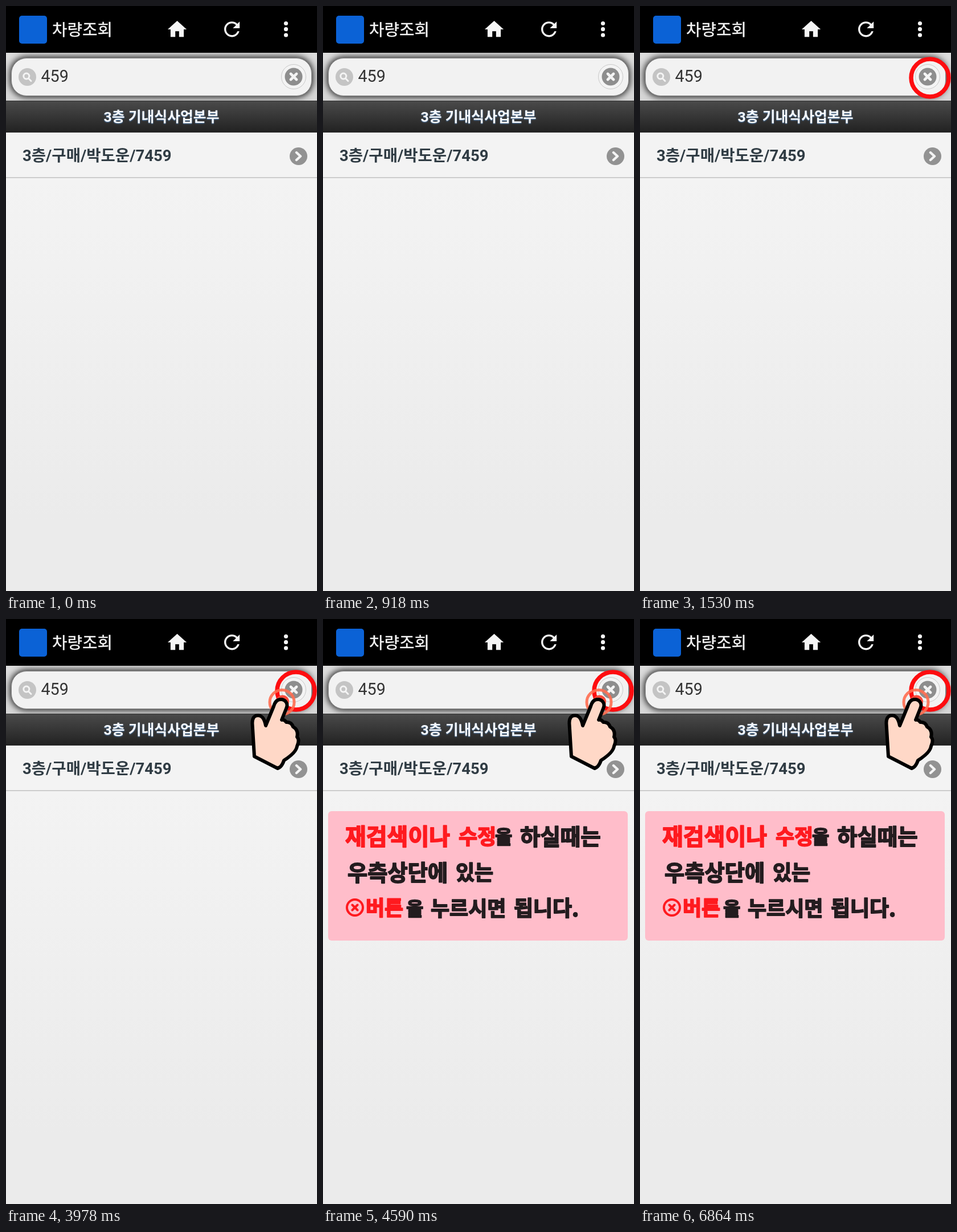
Recreate the animation shown at these times as an HTML page. Size 546 by 1026 pixels, loop 8.38 s.

```html
<!DOCTYPE html>
<html lang="ko">
<head>
<meta charset="utf-8">
<title>차량조회</title>
<style>
  html, body { margin: 0; width: 100%; height: 100%; overflow: hidden; }
  body { position: relative; background: linear-gradient(#f3f3f3 30%, #ebebeb 88%); }
  div, svg { position: absolute; left: 0; box-sizing: border-box; }
  div { width: 546px; }
  .top { top: 0; height: 82px; background: #000; }
  .search { top: 82px; height: 84px; background: linear-gradient(#ddd, #d6d6d6); overflow: hidden; }
  .search div {
    left: 9px; top: 9px; width: 528px; height: 67px; border-radius: 27px;
    background: #f2f2f2; border: 1px solid #888; box-shadow: 0 0 12px 2px #222;
  }
  .bar { top: 166px; height: 56px; background: linear-gradient(#4a4a4a, #222); border: solid #333; border-width: 1px 0; }
  .row { top: 222px; height: 80px; background: #f3f3f3; border-bottom: 2px solid #ccc; }
  svg { top: 0; }
  text { font-family: Roboto, "Noto Sans CJK KR", "Noto Sans CJK", sans-serif; }
  .title { stroke: #f5f5f5; stroke-width: .4; }
  .head { font-weight: 700; text-shadow: 0 1px 2px #5784b5; }
  .note text {
    font-family: "Noto Sans CJK KR", "Noto Sans CJK", sans-serif; font-weight: 900;
    fill: #231c1f; stroke: #231c1f; stroke-width: 1.8; stroke-linejoin: round;
  }
  .note .red { fill: #ff1a1f; stroke: #ff1a1f; }
  .line { fill: none; stroke: #f4f4f4; stroke-linecap: round; stroke-linejoin: round; }
</style>
</head>
<body>
<div class="top"></div>
<div class="search"><div></div></div>
<div class="bar"></div>
<div class="row"></div>

<svg width="546" height="1026" viewBox="0 0 546 1026">
  <!-- App bar -->
  <rect x="23" y="17" width="49" height="49" rx="5" fill="#0b62d6"/>
  <g fill="#f5f5f5">
    <text class="title" x="81" y="52" font-size="28.8">차량조회</text>
    <path transform="translate(280.6 21) scale(1.66)" d="M10 20v-6h4v6h5v-8h3L12 3 2 12h3v8z"/>
    <path transform="translate(376.2 20.4) scale(1.7)" d="M17.65 6.35C16.2 4.9 14.21 4 12 4c-4.42 0-7.99 3.58-7.99 8s3.57 8 7.99 8c3.73 0 6.84-2.55 7.73-6h-2.08c-.82 2.33-3.04 4-5.65 4-3.31 0-6-2.69-6-6s2.69-6 6-6c1.66 0 3.14.69 4.22 1.78L13 11h7V4z"/>
    <circle cx="491.5" cy="30.5" r="3.6"/>
    <circle cx="491.5" cy="40.7" r="3.6"/>
    <circle cx="491.5" cy="51" r="3.6"/>
  </g>

  <!-- Search field -->
  <circle cx="37.5" cy="124.5" r="15.5" fill="#c4c4c4"/>
  <path class="line" stroke-width="3" d="M40.8 123a5 5 0 1 0-10 0a5 5 0 1 0 10 0M39.6 127l4.4 4.5"/>
  <text x="61.5" y="133" font-size="28.7" fill="#333">459</text>
  <circle cx="505" cy="124" r="21.5" fill="#f4f4f4" stroke="#c8c8c8"/>
  <circle cx="505" cy="124" r="15.5" fill="#8e8e8e"/>
  <path class="line" stroke-width="4.6" d="M500 119l10 10m0-10l-10 10"/>

  <!-- Result list -->
  <text class="head" x="273" y="203" font-size="24.8" text-anchor="middle" fill="#f5f8fc">3층 기내식사업본부</text>
  <text x="29" y="272" font-size="27.5" font-weight="700" fill="#303c44">3층/구매/박도운/7459</text>
  <circle cx="513.5" cy="263.5" r="15.5" fill="#929292"/>
  <path class="line" stroke-width="4.4" d="M510 257l7 6.5l-7 6.5"/>

  <!-- Guide steps -->
  <circle data-at="1530" cx="509" cy="126" r="33" fill="none" stroke="#fe0d10" stroke-width="7.5"/>
  <g data-at="3060">
    <circle cx="484.5" cy="146" r="21.5" fill="none" stroke="#ff6d50" stroke-width="5" opacity=".9"/>
    <circle cx="485.5" cy="145" r="11.5" fill="#fb4a3a"/>
    <path fill="#ffd8c7" stroke="#000" stroke-width="6" stroke-linejoin="round"
      d="M470 153L456 187C454 177 451 170 443 169C435 169 432 175 432.5 184L436 241L477 262Q484 260 488 248C502 239 510 231 511 223Q516 212 511 207Q514 195 504 189Q501 180 492 181Q489 176 484 177L492 157C496 149 491 142 484 141C476 140 472 146 470 153Z"/>
  </g>
  <g data-at="4590" class="note">
    <rect x="9" y="337" width="526" height="227" rx="6" fill="#ffbdca"/>
    <text class="red" x="39" y="396" font-size="40">재검색이나</text>
    <text class="red" x="238" y="395" font-size="36">수정</text>
    <text x="302" y="394" font-size="33">을</text>
    <text x="346" y="396" font-size="38.5">하실때는</text>
    <text x="43" y="458.5" font-size="38.3">우측상단에</text>
    <text x="233" y="458" font-size="36">있는</text>
    <g fill="none" stroke="#ff1a1f" stroke-width="4" stroke-linecap="round">
      <circle cx="56" cy="506" r="14"/>
      <path d="M51.5 501.5l9 9m0-9l-9 9"/>
    </g>
    <text class="red" x="75" y="520" font-size="36">버튼</text>
    <text x="146" y="520" font-size="33">을</text>
    <text x="189" y="521" font-size="36">누르시면</text>
    <text x="335" y="521" font-size="37">됩니다.</text>
  </g>
</svg>

<script>
  const LOOP = 8380;
  const steps = document.querySelectorAll('[data-at]');

  function draw() {
    const t = performance.now() % LOOP;
    for (const s of steps) s.style.visibility = t >= +s.dataset.at ? 'visible' : 'hidden';
    requestAnimationFrame(draw);
  }
  draw();
</script>
</body>
</html>
```
